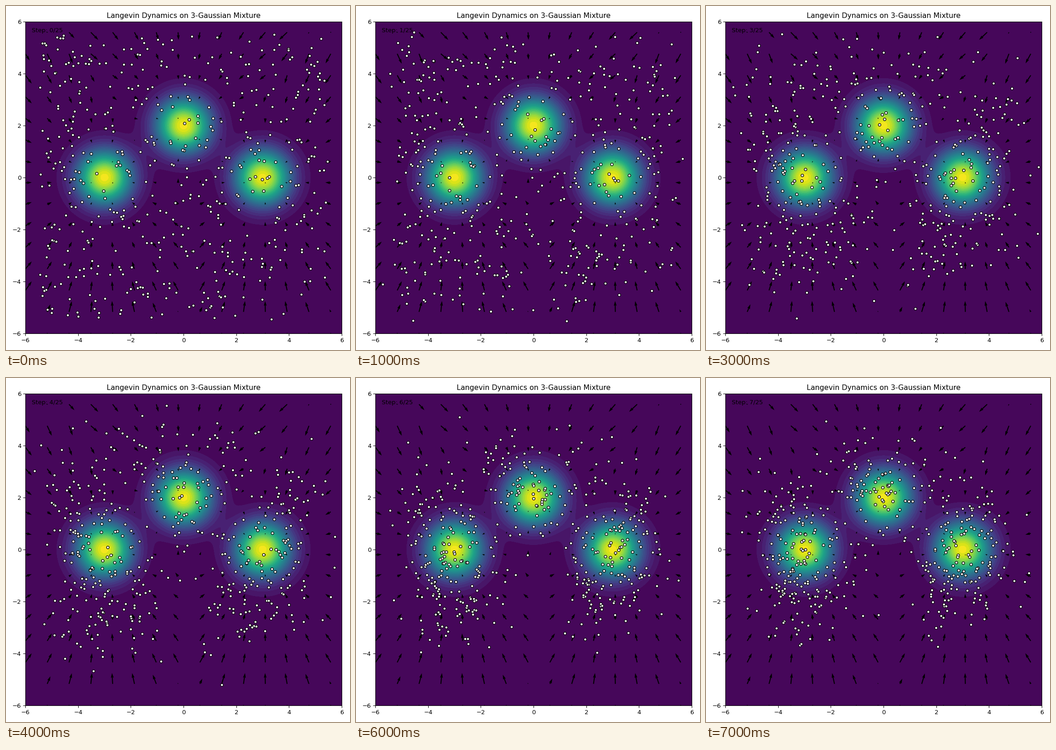
A matplotlib script for the animation above (8000 ms loop, 748 by 748 pixels).

```python
import numpy as np
import matplotlib.pyplot as plt
from matplotlib.animation import FuncAnimation

CENTERS = np.array([[-3.0, 0.0], [0.0, 2.0], [3.0, 0.0]])
VAR = 0.5
COUNT = 500
STEP = 0.05
FRAMES = 8
TOTAL = 25


def components(pts):
    """Offsets to each center and the weighted Gaussian densities."""
    diff = CENTERS - pts[..., None, :]
    dens = np.exp(-(diff ** 2).sum(-1) / (2 * VAR)) / (2 * np.pi * VAR)
    return diff, dens / len(CENTERS)


def density(pts):
    return components(pts)[1].sum(-1)


def score(pts):
    diff, dens = components(pts)
    grad = (dens[..., None] * diff).sum(-2) / VAR
    return grad / (dens.sum(-1)[..., None] + 1e-15)


def grid(n, stride=1):
    axis = np.linspace(-6, 6, n)[::stride]
    return np.stack(np.meshgrid(axis, axis), axis=-1)


def langevin_path():
    np.random.seed(42)
    pts = np.random.uniform(-5.5, 5.5, (COUNT, 2))
    path = [pts]
    for _ in range(FRAMES - 1):
        noise = np.random.randn(COUNT, 2)
        pts = pts + STEP * score(pts) + np.sqrt(2 * STEP) * noise
        path.append(pts)
    return path


path = langevin_path()

fig, ax = plt.subplots(figsize=(8, 8), dpi=93.5)

field = grid(200)
ax.contourf(field[..., 0], field[..., 1], density(field),
            levels=30, cmap="viridis")

base = grid(30, 2)
flow = score(base)
ax.quiver(base[..., 0], base[..., 1], flow[..., 0], flow[..., 1],
          color="black", scale=300, width=0.003)

dots = ax.scatter(path[0][:, 0], path[0][:, 1], s=20, c="white",
                  edgecolors="black", linewidths=1)
label = ax.text(0.02, 0.98, "", transform=ax.transAxes, va="top",
                fontsize=10, color="black")

ax.set_xlim(-6, 6)
ax.set_ylim(-6, 6)
ax.set_title("Langevin Dynamics on 3-Gaussian Mixture")
fig.tight_layout()


def update(i):
    dots.set_offsets(path[i])
    label.set_text(f"Step: {i}/{TOTAL}")
    return dots, label


anim = FuncAnimation(fig, update, frames=FRAMES, interval=1000, repeat=True)
plt.show()
```
